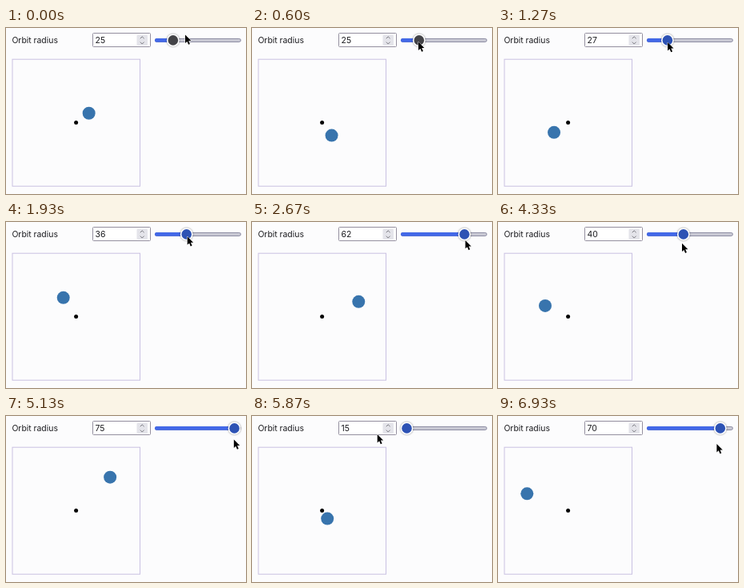
Animation of 300 by 208 pixels, one loop 6990 ms. Source, as an HTML page:

```html
<!DOCTYPE html>
<html lang="en">
<head>
<meta charset="utf-8">
<title>Orbit radius</title>
<style>
  html, body { margin: 0; width: 100%; height: 100%; overflow: hidden; background: #fcfcfd; }
  svg { display: block; width: 100%; height: 100%; }
  text { font: 10.4px Inter, "Liberation Sans", sans-serif; fill: #1b1b1f; }
  .thumb { filter: drop-shadow(0 .6px .8px rgba(0, 0, 0, .45)); }
</style>
</head>
<body>
<svg viewBox="0 0 300 208">
  <text x="7.4" y="19">Orbit radius</text>

  <rect x="108.5" y="6.5" width="72" height="17" rx="1" fill="#fff" stroke="#948f9f"/>
  <text id="number" x="111.6" y="19">25</text>
  <rect x="163.5" y="8.5" width="13.5" height="13.5" rx="1.5" fill="#e4e4ea"/>
  <path d="M167.8 13.2l2.4-2.4 2.4 2.4M167.8 17.6l2.4 2.4 2.4-2.4" fill="none" stroke="#77777e"/>

  <rect x="186.4" y="13.4" width="107" height="4" rx="2" fill="#cbcbd6" stroke="#7f7f98" stroke-width=".9"/>
  <rect id="fill" x="186" y="13" width="23" height="4.8" rx="2.2" fill="#4268e8"/>
  <g id="thumb" class="thumb">
    <circle r="7.9" fill="#fff"/>
    <circle id="knob" r="6.3"/>
  </g>

  <rect x="8" y="39.2" width="159.5" height="159" fill="none" stroke="#c9c1e2"/>
  <circle cx="87.6" cy="118.5" r="2.5"/>
  <circle id="planet" r="8" fill="#3874ad"/>

  <path id="cursor" d="M0 0V10.4L2.4 8.2 4.1 12.2 5.9 11.4 4.2 7.5H7.4Z" stroke="#fff" stroke-width=".9" paint-order="stroke"/>
</svg>
<script>
  const LOOP = 6990, FPS = 15, SCALE = 0.795, PRESS = 800;
  const MIN = 15, MAX = 75;

  // time, pointer x, pointer y, dragged value before clamping
  const path = [
    [0, 224, 8.5, 25],
    [600, 208, 17.5, 25],
    [900, 208.5, 18, 25],
    [1930, 226.7, 18.2, 36],
    [3400, 296.5, 27.5, 82],
    [4330, 230, 26.7, 40],
    [4650, 180, 25, 7],
    [5250, 297, 30, 84],
    [5870, 156.7, 23, -9],
    [6600, 297, 33, 86],
    [6930, 273.4, 35, 70]
  ];

  const get = id => document.getElementById(id);
  const [number, fill, thumb, knob, planet, cursor] =
    ["number", "fill", "thumb", "knob", "planet", "cursor"].map(get);

  // Tangent that flattens at turning points
  function slope(i, c) {
    const a = path[i - 1], b = path[i], d = path[i + 1];
    if (!a || !d) return 0;
    const left = (b[c] - a[c]) / (b[0] - a[0]);
    const right = (d[c] - b[c]) / (d[0] - b[0]);
    return left * right <= 0 ? 0 : 2 * left * right / (left + right);
  }

  function sample(t, c) {
    let i = 0;
    while (i < path.length - 2 && t >= path[i + 1][0]) i++;
    const a = path[i], b = path[i + 1], h = b[0] - a[0];
    const u = Math.min(1, (t - a[0]) / h), v = 1 - u;
    return v * v * (1 + 2 * u) * a[c] + u * u * (3 - 2 * u) * b[c]
      + h * u * v * (v * slope(i, c) - u * slope(i + 1, c));
  }

  const move = (el, x, y) => el.setAttribute("transform", `translate(${x} ${y})`);

  function draw(now) {
    const step = Math.floor((now % LOOP + 3.5) * FPS / 1000);
    const t = Math.min(Math.round(step * 100 / FPS) * 10, 6930);

    const value = Math.round(Math.max(MIN, Math.min(MAX, sample(t, 3))));
    const x = 193.5 + (value - MIN) / (MAX - MIN) * 92;
    number.textContent = value;
    fill.setAttribute("width", x - 186);
    move(thumb, x, 15.4);
    knob.setAttribute("fill", t < PRESS ? "#434347" : "#2d52b4");

    const rate = t < 600 ? 0.15 : 0.1373;
    const angle = (53.4 + (t - 600) * rate) * Math.PI / 180;
    const r = value * SCALE;
    move(planet, 87.7 + r * Math.cos(angle), 118.6 + r * Math.sin(angle));

    move(cursor, sample(t, 1), sample(t, 2));
  }

  const start = performance.now();
  function tick() {
    draw(performance.now() - start);
    requestAnimationFrame(tick);
  }
  tick();
</script>
</body>
</html>
```
